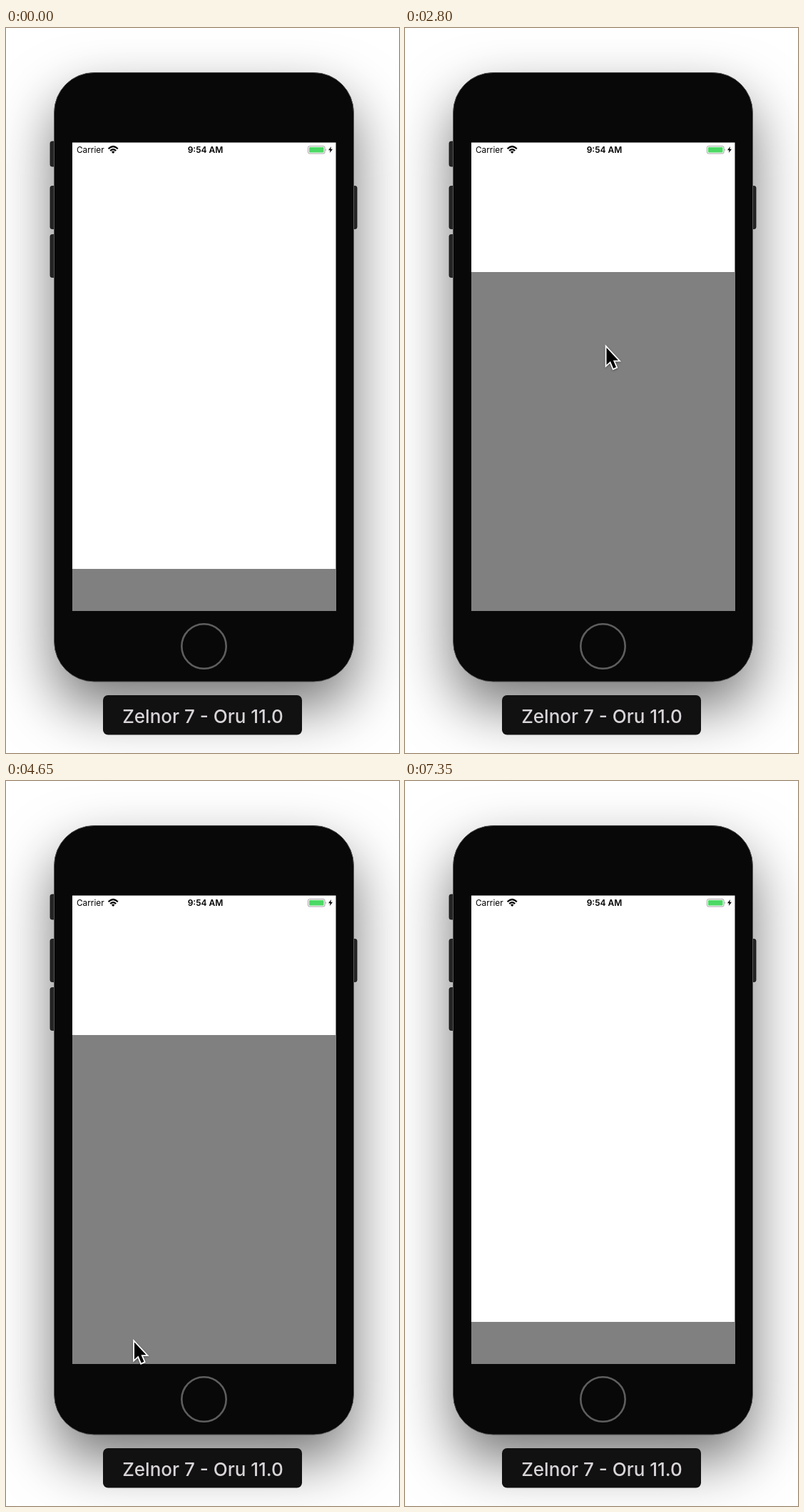
An HTML page that plays this animation: 551x1016 px, repeating every 7450 ms.

```html
<!DOCTYPE html>
<html lang="en">
<head>
<meta charset="utf-8">
<title>Bottom sheet</title>
<style>
  html, body { margin: 0; width: 100%; height: 100%; overflow: hidden; background: #fff; }
  .shadow {
    position: absolute; left: 67px; top: 62px; width: 421px; height: 854px;
    border-radius: 56px; box-shadow: 0 36px 80px rgba(0, 0, 0, .54);
  }
  svg { position: absolute; left: 0; top: 0; display: block; }
  text { font-family: Inter, Roboto, sans-serif; }
</style>
</head>
<body>
<div class="shadow"></div>
<svg width="551" height="1016" viewBox="0 0 551 1016">
  <g fill="#252525" stroke="#111" stroke-width=".8">
    <rect x="62" y="159" width="10" height="35" rx="2.5"/>
    <rect x="62" y="221.5" width="10" height="60" rx="2.5"/>
    <rect x="62" y="289.5" width="10" height="60" rx="2.5"/>
    <rect x="482" y="221.5" width="10" height="60" rx="2.5"/>
  </g>
  <rect x="67.5" y="62.5" width="420" height="853.5" rx="56" fill="#080808" stroke="#555"/>
  <circle cx="277.5" cy="866.5" r="31.2" fill="none" stroke="#5e5e5e" stroke-width="2.6"/>

  <rect x="93" y="160.5" width="369.5" height="656.5" fill="#fff"/>
  <rect id="sheet" x="93" width="369.5" fill="#808080"/>

  <text x="99" y="175" font-size="11.8">Carrier</text>
  <text x="279.5" y="175" font-size="12" font-weight="600" text-anchor="middle">9:54 AM</text>
  <g fill="none" stroke="#000" stroke-width="2.2">
    <path d="M143.600 169.200Q150.200 162.800 156.800 169.200"/>
    <path d="M146.200 172Q150.200 168.200 154.200 172"/>
  </g>
  <path d="M147.900 173.400Q150.200 171.400 152.500 173.400L150.200 175.900Z"/>
  <rect x="423.500" y="165.500" width="23.500" height="10.500" rx="2" fill="#fff" stroke="#8c8c8c" stroke-width=".8"/>
  <rect x="425" y="167" width="20.500" height="7.500" rx=".8" fill="#4cd964"/>
  <path d="M448 169Q449.800 170.700 448 172.500Z" fill="#8c8c8c"/>
  <path d="M456 166L452 171.300H454.600L453.800 175L458 169.700H455.300Z"/>

  <rect x="136" y="935" width="279" height="55.500" rx="7" fill="#111"/>
  <text x="276" y="973.500" font-size="26" font-weight="500" fill="#d8d4d8" text-anchor="middle">Zelnor 7 - Oru 11.0</text>

  <path id="cursor" d="M0 0V24L5.500 19L9.700 29L13.500 27.300L9.400 17.700H16.500Z"
    stroke="#fff" stroke-width="3.600" paint-order="stroke"
    style="filter: drop-shadow(0 1.500px 1.500px rgba(0, 0, 0, .4))"/>
</svg>
<script>
const LOOP = 7450, STEP = 50;
const CLOSED = 758, OPEN = 342, SCREEN_BOTTOM = 817;
const ENTER = { time: 50, x: 517, y: 930 };
const EXIT = { time: 6550, x: 28, y: 730 };
const sheet = document.getElementById('sheet');
const cursor = document.getElementById('cursor');

// The pointer approaches, flicks the sheet open, hovers, then swipes it closed.
const cycles = [
  { approach: ENTER.time, open: 1239, close: 2800, press: [318, 782.5], hover: [282.5, 448], drop: [258, 640] },
  { approach: 3450, open: 4018, close: 5790, press: [180, 786.5], hover: [249, 465.5], drop: [230, 660] },
];

const clamp = x => Math.min(Math.max(x, 0), 1);
const mix = (a, b, k) => a + (b - a) * k;
const smooth = x => x * x * (3 - 2 * x);

// Underdamped spring, overshooting by about four percent.
function spring(ms) {
  const damping = 1.0227, angle = 3.4 * ms / 1000;
  return 1 - Math.exp(-damping * angle) * (Math.cos(angle) + damping * Math.sin(angle));
}

// Drag with a soft landing.
function swipe(ms) {
  const x = clamp(ms / 657);
  return 1 - (1 - x) ** 2 * (1 + 1.7 * x);
}

function sheetTop(t) {
  const cycle = cycles.findLast(c => t >= c.open);
  if (!cycle) return CLOSED;
  return t < cycle.close
    ? mix(CLOSED, OPEN, spring(t - cycle.open))
    : mix(OPEN, CLOSED, swipe(t - cycle.close));
}

function pointerAt(t) {
  let { x, y } = ENTER;
  const glide = (start, end, [toX, toY]) => {
    const k = smooth(clamp((t - start) / (end - start)));
    x = mix(x, toX, k);
    y = mix(y, toY, k);
  };
  for (const { approach, open, close, press, hover, drop } of cycles) {
    glide(approach, open, [press[0], 815]);
    glide(open, open + 150, press);
    glide(open + 700, open + 1400, hover);
    glide(close, close + 320, drop);
  }
  glide(EXIT.time - 440, EXIT.time, [EXIT.x, EXIT.y]);
  return [x, y];
}

function draw(now) {
  const t = Math.floor(now % LOOP / STEP) * STEP;
  const top = Math.round(sheetTop(t));
  sheet.setAttribute('y', top);
  sheet.setAttribute('height', SCREEN_BOTTOM - top);
  const shown = t >= ENTER.time && t < EXIT.time;
  cursor.setAttribute('visibility', shown ? 'visible' : 'hidden');
  cursor.setAttribute('transform', `translate(${pointerAt(t)})`);
}

const begin = performance.now();
function tick() {
  draw(performance.now() - begin);
  requestAnimationFrame(tick);
}
tick();
</script>
</body>
</html>
```
